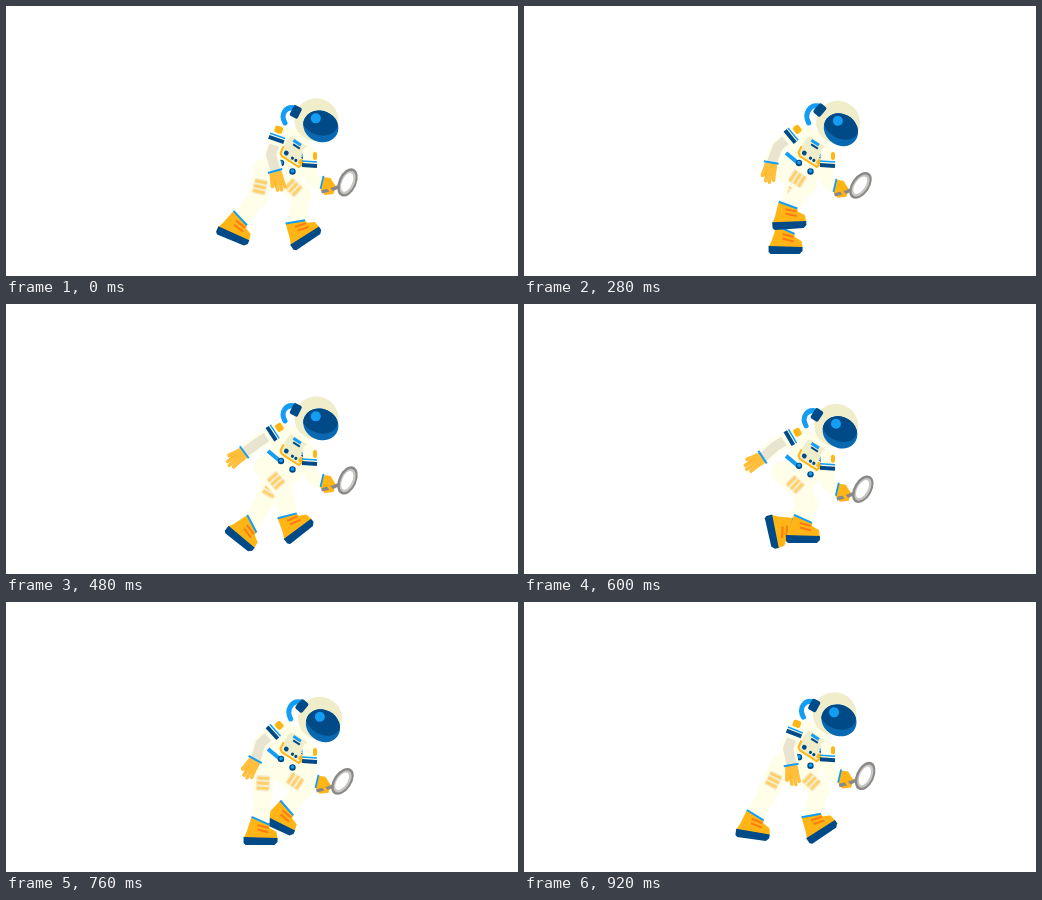
An HTML page with a canvas for the animation above (0.96 s loop, 512 by 270 pixels).

```html
<!DOCTYPE html>
<html>
<head>
<meta charset="utf-8">
<title>Walking astronaut</title>
<style>
html, body { margin: 0; width: 100%; height: 100%; overflow: hidden; background: #fff; }
canvas { display: block; }
</style>
</head>
<body>
<canvas id="stage" width="512" height="270"></canvas>
<script>
const ctx = document.getElementById('stage').getContext('2d');
const LOOP = 960, STEP = 40, TURN = 2 * Math.PI;
const IVORY = '#fffee9', CREAM = '#f0edca', SHADE = '#e9e4d0', NAVY = '#004b87',
  BLUE = '#149df5', ORANGE = '#ffb515', GLOVE = '#ffbf3c', RUST = '#ff7a14', GREY = '#8b8987';

// Both legs share one gait, half a loop apart; kick and lift set how the foot tips.
const nearLeg = { hip: [258, 162], foot: [260, 229], delay: 0, kick: 42, lift: 0 };
const farLeg = { hip: [274, 168], foot: [267, 234], delay: LOOP / 2, kick: 55, lift: 30 };

const { sin, cos, hypot, sqrt, max, min, PI } = Math;
const rad = degrees => degrees * PI / 180;
const mix = (a, b, u) => [a[0] + (b[0] - a[0]) * u, a[1] + (b[1] - a[1]) * u];
const add = (a, b) => [a[0] + b[0], a[1] + b[1]];
const polar = (from, turn, length) => add(from, [length * cos(turn), length * sin(turn)]);

function placed([x, y], turn, draw) {
  ctx.save();
  ctx.translate(x, y);
  ctx.rotate(turn);
  draw();
  ctx.restore();
}

function trace(points) {
  ctx.beginPath();
  points.forEach(p => ctx.lineTo(p[0], p[1]));
}

function poly(color, ...points) {
  trace(points);
  ctx.closePath();
  ctx.fillStyle = color;
  ctx.fill();
}

function line(color, width, points, cap = 'butt') {
  trace(points);
  ctx.lineCap = cap;
  ctx.lineJoin = 'round';
  ctx.strokeStyle = color;
  ctx.lineWidth = width;
  ctx.stroke();
}

function oval(color, x, y, rx, ry = rx, turn = 0) {
  ctx.beginPath();
  ctx.ellipse(x, y, rx, ry, turn, 0, TURN);
  ctx.fillStyle = color;
  ctx.fill();
}

function box(color, x, y, w, h, r = 0) {
  ctx.beginPath();
  ctx.roundRect(x, y, w, h, r);
  ctx.fillStyle = color;
  ctx.fill();
}

// The foot travels almost linearly back and forth and tips only while it swings.
function footPose(leg, time) {
  const phase = (time + leg.delay) / LOOP * TURN;
  const stride = (cos(phase) + cos(3 * phase) / 9) * .9;
  const swing = min(1, (time + leg.delay + 60) % LOOP / 660);
  return {
    at: add(leg.foot, [-33.5 * stride, -10 * sin(phase - .15)]),
    turn: rad(leg.kick * sin(TURN * swing) + leg.lift * sin(PI * swing))
  };
}

// Two-bone knee that always bends forward.
function kneeBetween(hip, ankle, bone) {
  const dx = ankle[0] - hip[0], dy = ankle[1] - hip[1], reach = hypot(dx, dy);
  const bend = sqrt(max(0, bone * bone - reach * reach / 4)) / reach;
  return add(mix(hip, ankle, .5), [dy * bend, -dx * bend]);
}

function drawBoot() {
  poly(ORANGE, [-17, -3], [-14, -9], [-9, -24], [9, -16], [9, -13], [16, -9], [17, -2]);
  line(BLUE, 2, [[-9, -24], [9, -16]]);
  for (const y of [-16, -11.5]) line(RUST, 2, [[-3, y], [8, y + 3]]);
  poly(NAVY, [-17, -4], [17, -3], [17, 1], [14, 4], [-15, 4], [-17, 2]);
}

function drawLeg(leg, time, shift) {
  const foot = footPose(leg, time);
  const hip = add(leg.hip, shift), ankle = polar(foot.at, foot.turn - PI / 2, 18);
  const knee = kneeBetween(hip, ankle, 29);
  line(IVORY, 21, [hip, knee], 'round');
  line(IVORY, 18, [knee, ankle]);
  const thigh = Math.atan2(knee[1] - hip[1], knee[0] - hip[0]);
  placed(mix(hip, knee, .63), thigh - PI / 2, () => {
    box('#f6ecd0', -7, -8, 14, 16, 2);
    for (const y of [-5, 0, 5]) box('#ffd16b', -6, y - 1.5, 12, 3, 1);
  });
  placed(foot.at, foot.turn, drawBoot);
}

function drawTorso() {
  poly(IVORY, [275, 117], [300, 127], [308, 146], [299, 168], [288, 178],
    [270, 178], [253, 172], [257, 158], [264, 143], [268, 128]);
}

function drawChest() {
  line(BLUE, 4, [[262, 146], [274, 156]]);
  placed([290, 144], rad(33), () => {
    box(CREAM, -13, -10, 26, 21, 3);
    line(ORANGE, 2, [[-13, 3], [-12, 10], [-9, 12], [11, 12], [13, 5]]);
    box(BLUE, -8, -9, 9, 3);
    box(NAVY, -6, -5, 8, 2);
    box(BLUE, 7, -5, 4, 6);
    box(NAVY, 8, 1, 3, 2);
    oval(NAVY, -7, 7, 2.4);
    for (const x of [1, 5]) oval(NAVY, x, 8, 1.6);
    box(ORANGE, 8, 4, 5, 5, 1);
  });
  for (const [x, y] of [[275, 156], [286.5, 164.5]]) {
    oval(NAVY, x, y, 3.2);
    oval(BLUE, x, y - .5, 1.8);
  }
}

function drawFarArm(shift, reach) {
  const elbow = add([305, 171], mix(shift, reach, .5));
  line(IVORY, 13, [add([303, 146], shift), elbow, add([315, 177], reach)], 'round');
  placed(shift, 0, () => {
    box(ORANGE, 307, 145, 4, 8, 2);
    line(BLUE, 1.5, [[296, 154], [311, 155]]);
    line(NAVY, 4, [[296, 158], [311, 159]]);
  });
}

function drawLens(tilt) {
  poly(ORANGE, [317, 169], [324, 170], [329, 178], [327, 186], [318, 187], [314, 181]);
  line(BLUE, 1.8, [[317, 168], [314, 181]]);
  line(GREY, 3.5, [[315, 184], [327, 181], [334, 178]]);
  line(ORANGE, 3, [[321, 179], [325, 184]], 'round');
  placed([341, 174.5], tilt, () => {
    oval(GREY, 0, 0, 9, 15);
    oval('#c9c7c4', .2, 0, 6.8, 12.4);
    oval('#fff', -.3, 0, 5, 10);
  });
}

function drawHose(ear, end) {
  ctx.beginPath();
  ctx.moveTo(ear[0] - 1, ear[1] - 4);
  ctx.bezierCurveTo(ear[0] - 10, ear[1] - 6, end[0] - 5, end[1] - 9, ...end);
  ctx.strokeStyle = BLUE;
  ctx.lineWidth = 5;
  ctx.stroke();
}

function drawHead() {
  oval(CREAM, 0, 0, 22, 21.5);
  placed([-20.5, -8], rad(27), () => box(NAVY, -4.5, -6, 9, 12, 2));
  ctx.save();
  ctx.beginPath();
  ctx.ellipse(4.5, 6.5, 18, 15.5, rad(24), 0, TURN);
  ctx.clip();
  box('#0869b2', -20, -20, 50, 50);
  oval(NAVY, 3, 1, 19, 14, rad(22));
  oval(BLUE, -.5, -1.5, 5);
  ctx.restore();
}

function drawGlove() {
  line(GLOVE, 4, [[-5, 4], [-7, 14]], 'round');
  box(GLOVE, -7, 0, 13, 14, 3);
  for (const x of [-2.5, .8, 4]) line(GLOVE, 3.6, [[x, 10], [x * 1.2, 20 - x * x / 6]], 'round');
  line(ORANGE, 1, [[-3, 8], [-4, 16]]);
  line(BLUE, 2, [[-8, 0], [7, 0]]);
}

function drawNearArm(phase, shift) {
  const sway = cos(phase - .2);
  const upper = rad(134 - 19 * sway - 6 * cos(2 * phase)), lower = rad(109 - 35 * sway);
  const shoulder = add([273.5, 123.5], shift), band = polar(shoulder, upper, 9);
  const elbow = polar(shoulder, upper, 25.5), cuff = polar(elbow, lower, 17);
  line(IVORY, 15, [polar(shoulder, upper, 3), elbow, cuff]);
  line(SHADE, 10, [mix(band, elbow, .4), elbow, cuff]);
  placed(band, upper - PI / 2, () => {
    box(ORANGE, -5, -13, 8, 7, 2);
    box(BLUE, -8, -4, 16, 1.5);
    box(NAVY, -8, -1.5, 16, 4);
  });
  placed(cuff, lower - PI / 2 - rad(12 * sin(phase)), drawGlove);
}

function render(time) {
  ctx.fillStyle = '#fff';
  ctx.fillRect(0, 0, 512, 270);
  // The upper body bobs once per step, each part trailing a little.
  const phase = time / LOOP * TURN, step = 2 * phase, dip = cos(step);
  const shift = [0, 2 + 4 * sin(step - .26)];
  const reach = [-2.2 + 2.7 * dip, 5 + 6.5 * sin(step - .5)];
  const head = [312.3 - 2 * dip, 116.5 + 5.5 * sin(step - .5)];
  const nod = rad(7 - 7 * dip);

  placed(shift, 0, drawTorso);
  drawLeg(farLeg, time, shift);
  drawLeg(nearLeg, time, shift);
  placed(shift, 0, drawChest);
  drawFarArm(shift, reach);
  placed(reach, 0, () => drawLens(rad(24) + nod * .8));
  drawHose(polar(head, nod + rad(201), 22), add([279 + nod * 25, 116], shift));
  placed(head, nod, drawHead);
  drawNearArm(phase, shift);
}

const start = performance.now();
function tick() {
  const elapsed = (performance.now() - start) % LOOP;
  render(Math.floor(elapsed / STEP) * STEP);
  requestAnimationFrame(tick);
}
tick();
</script>
</body>
</html>
```
